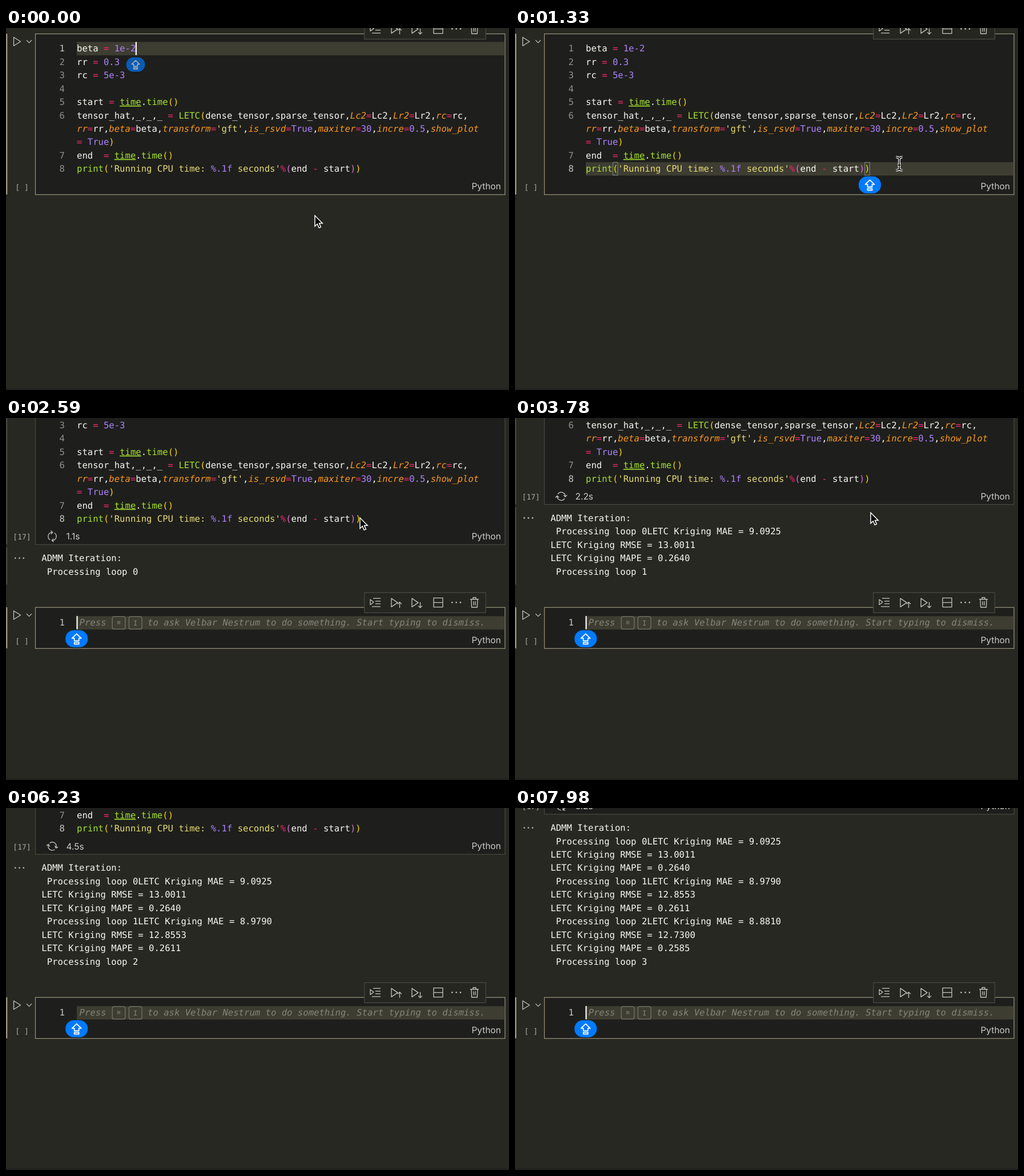
Recreate the animation shown at these times as an HTML page. Size 881 by 635 pixels, loop 8 s.

```html
<!DOCTYPE html>
<html lang="en">
<head>
<meta charset="utf-8">
<title>Notebook run</title>
<style>
html, body { margin: 0; width: 100%; height: 100%; overflow: hidden; background: #272822; }
svg { display: block; width: 881px; height: 635px; }
text { font: 15.6px "DejaVu Sans Mono", monospace; fill: #f8f8f2; white-space: pre; text-rendering: geometricPrecision; }
.code, .out { stroke: currentColor; stroke-width: 0; }
.ui { font: 15.5px Inter, sans-serif; fill: #ccccc7; }
.count { font-size: 13px; fill: #aaaaa4; text-anchor: middle; }
.num { fill: #90908a; text-anchor: end; }
.num.on { fill: #c8c8c4; }
.p { fill: #f92672; }
.n { fill: #ae81ff; }
.s { fill: #e6db74; }
.f { fill: #a6e22e; }
.u { fill: #a6e22e; text-decoration: underline; }
.a { fill: #fd971f; font-style: italic; }
.y { fill: #ffd700; }
.o { fill: #da70d6; }
.hint, .key { fill: #85857b; font-style: italic; }
.key { font-style: normal; font-size: 12px; text-anchor: middle; }
.keybox { fill: none; stroke: #77776c; stroke-width: 1.2; }
.band { fill: #3e3d32; }
.box { fill: #1e1f1c; stroke: #99947c; stroke-width: 1.2; }
.bar { fill: #99947c; }
.dim .box { stroke: #484940; }
.dim .bar, .outbar { fill: #45463e; }
.icon { fill: none; stroke: #c5c5c0; stroke-width: 1.3; stroke-linejoin: round; }
.dots { fill: #c5c5c0; }
.match { fill: rgba(0, 100, 0, .1); stroke: #888; }
.caret { fill: #f8f8f0; }
</style>
</head>
<body>
<svg id="stage" viewBox="0 0 881 635" xmlns="http://www.w3.org/2000/svg"></svg>
<script>
const LOOP = 8000, STEP = 70, ROW = 23.44, CH = 9.392, LEFT = 124;
const CLICK = 525, RUN = 1430, BLINK = 525, SPIN = 1575, LEAVE = 5180;
const PRINTS = [1890, 3640, 5460, 7280];
const SCROLL = 3 * ROW;
const TOP = 10, BOTTOM = 292, NEXT = 322;

const CODE = [
  [1, "beta {p=} {n1e-2}"],
  [2, "rr {p=} {n0.3}"],
  [3, "rc {p=} {n5e-3}"],
  [4, ""],
  [5, "start {p=} {utime}.{ftime}{y()}"],
  [6, "tensor_hat,_,_,_ {p=} {fLETC}{y(}dense_tensor,sparse_tensor,{aLc2}{p=}Lc2,{aLr2}{p=}Lr2,{arc}{p=}rc,"],
  ["", "{arr}{p=}rr,{abeta}{p=}beta,{atransform}{p=}{s'gft'},{ais_rsvd}{p=}{nTrue},{amaxiter}{p=}{n30},{aincre}{p=}{n0.5},{ashow_plot}"],
  ["", "{p=} {nTrue}{y)}"],
  [7, "end  {p=} {utime}.{ftime}{y()}"],
  [8, "{fprint}{y(}{s'Running CPU time: }{n%.1f}{s seconds'}{p%}{o(}end {p-} start{o)}{y)}"]
];
const SCORES = [
  ["9.0925", "13.0011", "0.2640"],
  ["8.9790", "12.8553", "0.2611"],
  ["8.8810", "12.7300", "0.2585"]
];
// time, x, y of the pointer
const PATH = [
  [0, 541, 329], [70, 541, 329], [525, 673, 238], [1820, 673, 238], [2310, 620, 175],
  [2730, 620, 175], [3220, 623, 166], [4410, 623, 166], [4830, 758, 169],
  [4970, 758, 169], [LEAVE, 715, -30]
];

const rowY = i => 36 + ROW * i;
const rect = (cls, x, y, w, h, r = 0) =>
  `<rect class="${cls}" x="${x}" y="${y}" width="${w}" height="${h}" rx="${r}"/>`;
const text = (cls, x, mid, body, id = "") =>
  `<text class="${cls}" x="${x}" y="${mid + 5.4}"${id && ` id="${id}"`}>${body}</text>`;
const group = (id, body, cls = "") => `<g id="${id}" class="${cls}">${body}</g>`;
const icon = (d, x, y) => `<path class="icon" transform="translate(${x} ${y})" d="${d}"/>`;
const dots = (x, y) => `<g class="dots">${[-7.3, 0, 7.3].map(d =>
  `<circle cx="${x + d}" cy="${y}" r="1.3"/>`).join("")}</g>`;
const color = s => s.replace(/\{(.)([^}]*)\}/g, '<tspan class="$1">$2</tspan>');

const frame = bottom =>
  rect("bar", 0, TOP, 2.4, bottom - TOP) +
  rect("box", 51.5, TOP + .3, 822.5, bottom - TOP);

const runButton = icon("M0 0L12 7.5L0 15Z", 13.5, 16.2) + icon("M0 0L4.5 4.5L9 0", 36, 21.4);

const language = bottom =>
  `<text class="ui" x="867" y="${bottom - 8.6}" text-anchor="end">Python</text>`;

const toolbar =
  `<rect x="627.7" y="-15.6" width="212.6" height="35.2" fill="#252620" stroke="#4a4b43" stroke-width="1.2"/>` +
  icon("M0 2V11L6 6.5ZM5 0H18M9 5H18M9 9.5H18M3 14.5H18", 638, -5.6) +
  icon("M0 0L11 7.5L0 15ZM14.5 16.5V6.5M11 10L14.5 6.5L18 10", 675, -5.6) +
  icon("M0 0L11 7.5L0 15ZM14.5 6.5V16.5M11 13L14.5 16.5L18 13", 711, -5.6) +
  icon("M0 0H16V16H0ZM0 8H16", 749, -6.4) +
  dots(788.7, 1.6) +
  icon("M0 3H15M5 3V0H10V3M2 3L2.6 17H12.4L13 3M6 6.5V13.5M9 6.5V13.5", 813, -7);

const codeLines = CODE.map(([n, src], i) =>
  text("num", 103, rowY(i), n, n && "n" + n) + text("code", LEFT, rowY(i), color(src))).join("");

const sync = [0, 180].map(a =>
  `<path class="icon" transform="rotate(${a})" d="M-6-3.8A7.1 7.1 0 0 1 7.1 0M4-2.2L7.1.9L10-2.2"/>`).join("");

const hint =
  text("hint", 128.5, 37, "Press") +
  rect("keybox", 186.2, 26.3, 22.6, 22, 3) +
  `<text class="key" x="197.5" y="41.2" style="font-size:11px">⌘</text>` +
  rect("keybox", 215.4, 26.3, 22.6, 22, 3) +
  `<text class="key" x="226.7" y="41.7">I</text>` +
  text("hint", 248, 37, "to ask Velbar Nestrum to do something. Start typing to dismiss.");

const badge =
  `<rect x="-18" y="-12" width="36" height="30" rx="15" fill="#000" opacity=".12"/>` +
  `<rect x="-19.5" y="-15" width="39" height="30" rx="14.5" fill="#007aff"/>` +
  `<path d="M0-8.5L8-.8H4V3.6H-4V-.8H-8ZM-4 6.4H4V9.4H-4Z" fill="none" stroke="#fff" stroke-width="1.8" stroke-linejoin="round"/>`;

const beam = "M-5.5-11.5Q0-11.5 0-8Q0-11.5 5.5-11.5M0-8.5V8.5M-5.5 11.5Q0 11.5 0 8Q0 11.5 5.5 11.5M-3 2.5H3";
const pointer =
  `<path id="arrow" d="M0 0V18.7L4.3 14.7L7.2 21.6L10.4 20.2L7.5 13.4H13.2Z" fill="#000" stroke="#fff" stroke-width="1.5"/>` +
  `<g id="beam" fill="none"><path d="${beam}" stroke="#fff" stroke-width="4"/><path d="${beam}" stroke="#000" stroke-width="1.6"/></g>`;

const stage = document.getElementById("stage");
stage.innerHTML =
  rect("", 0, 632, 881, 3).replace("<rect", '<rect fill="#232220"') +
  group("first",
    frame(BOTTOM) +
    group("rowBand", rect("band", LEFT, 24.4, 749.4, ROW)) +
    group("pair", rect("match", LEFT + 5 * CH + .5, rowY(9) - 11.2, CH - .8, 22.4) +
      rect("match", LEFT + 52 * CH + .3, rowY(9) - 11.2, CH - .8, 22.4)) +
    codeLines +
    group("idle", runButton) +
    text("count", 28, 278.2, "[ ]", "count") +
    group("busy", group("spin", sync) + text("ui", 105.5, 278.2, "", "clock")) +
    language(BOTTOM) +
    group("result", rect("outbar", 0, 297, 2.4, 0).replace("<rect", '<rect id="outbar"') +
      dots(23.5, 316) + group("lines", "", "out"))) +
  `<g transform="translate(0 ${NEXT})">` +
  group("second",
    frame(82) + rect("band", LEFT, 25.6, 749.4, ROW) + runButton +
    text("count", 28, 68.2, "[ ]") + text("num on", 103, 37, "1") + hint + language(82)) + "</g>" +
  group("tools", toolbar) +
  group("caret", rect("caret", 0, -11.6, 2.3, 23.2)) +
  group("badge", badge) +
  group("mouse", pointer);

const el = {};
for (const node of stage.querySelectorAll("[id]")) el[node.id] = node;

const show = (node, on) => node.setAttribute("display", on ? "inline" : "none");
const move = (node, x, y, more = "") => node.setAttribute("transform", `translate(${x} ${y}) ${more}`);
const clamp = v => Math.max(0, Math.min(1, v));

function outputLines(count) {
  let lines = ["ADMM Iteration:", " Processing loop 0"];
  for (let i = 0; i < count; i++) {
    const [mae, rmse, mape] = SCORES[i];
    lines[lines.length - 1] += `LETC Kriging MAE = ${mae}`;
    lines.push(`LETC Kriging RMSE = ${rmse}`, `LETC Kriging MAPE = ${mape}`, ` Processing loop ${i + 1}`);
  }
  return lines.map((s, i) => text("out", 62.3, 316 + ROW * i, s)).join("");
}

function mouseAt(t) {
  const i = PATH.findIndex(k => k[0] > t);
  if (i < 0) return PATH[PATH.length - 1].slice(1);
  const [t0, x0, y0] = PATH[i - 1], [t1, x1, y1] = PATH[i];
  const p = (t - t0) / (t1 - t0), e = p * p * (3 - 2 * p);
  return [x0 + (x1 - x0) * e, y0 + (y1 - y0) * e];
}

let shown = -1;
function draw(t) {
  const clicked = t >= CLICK, running = t >= RUN;
  const printed = PRINTS.filter(p => t >= p).length;
  const dy = -SCROLL * printed;

  move(el.first, 0, dy);
  el.first.setAttribute("class", running ? "dim" : "");
  show(el.first.querySelector(".bar"), t < LEAVE);
  show(el.outbar, t < LEAVE);
  show(el.rowBand, !running);
  move(el.rowBand, 0, clicked ? ROW * 9 : 0);
  show(el.pair, clicked && !running);
  el.n1.setAttribute("class", clicked ? "num" : "num on");
  el.n8.setAttribute("class", clicked ? "num on" : "num");

  show(el.idle, !running);
  show(el.busy, running);
  show(el.second, running);
  show(el.result, printed > 0);
  el.count.textContent = running ? "[17]" : "[ ]";
  move(el.tools, 0, running ? NEXT : 0);
  move(el.spin, 81, 278, `rotate(${(t - 3780) / SPIN * 360})`);
  el.clock.textContent = (Math.floor(Math.max(0, t - 1427) * .00947) / 10).toFixed(1) + "s";
  el.outbar.setAttribute("height", Math.max(0, -dy - 5));
  if (printed !== shown) {
    shown = printed;
    el.lines.innerHTML = printed ? outputLines(printed - 1) : "";
  }

  const [since, x, y] = running ? [RUN, LEFT, 359]
    : clicked ? [CLICK, LEFT + 53 * CH, rowY(9)]
    : [-145, LEFT + 11 * CH, rowY(0)];
  show(el.caret, Math.floor((t - Math.max(0, since)) / BLINK) % 2 === 0);
  move(el.caret, x - .6, y);
  const pop = clamp((t - since) / 240);
  move(el.badge, x - .3, y + 28.2, `scale(${.6 + .4 * pop})`);
  el.badge.setAttribute("opacity", .15 + .85 * pop);

  const [mx, my] = mouseAt(t), editing = my < BOTTOM && t < 1890;
  move(el.mouse, mx, my);
  show(el.mouse, t < LEAVE);
  show(el.beam, editing);
  show(el.arrow, !editing);
}

const start = performance.now();
function tick() {
  const t = (performance.now() - start) % LOOP;
  draw(Math.floor(t / STEP) * STEP);
  requestAnimationFrame(tick);
}
tick();
</script>
</body>
</html>
```
